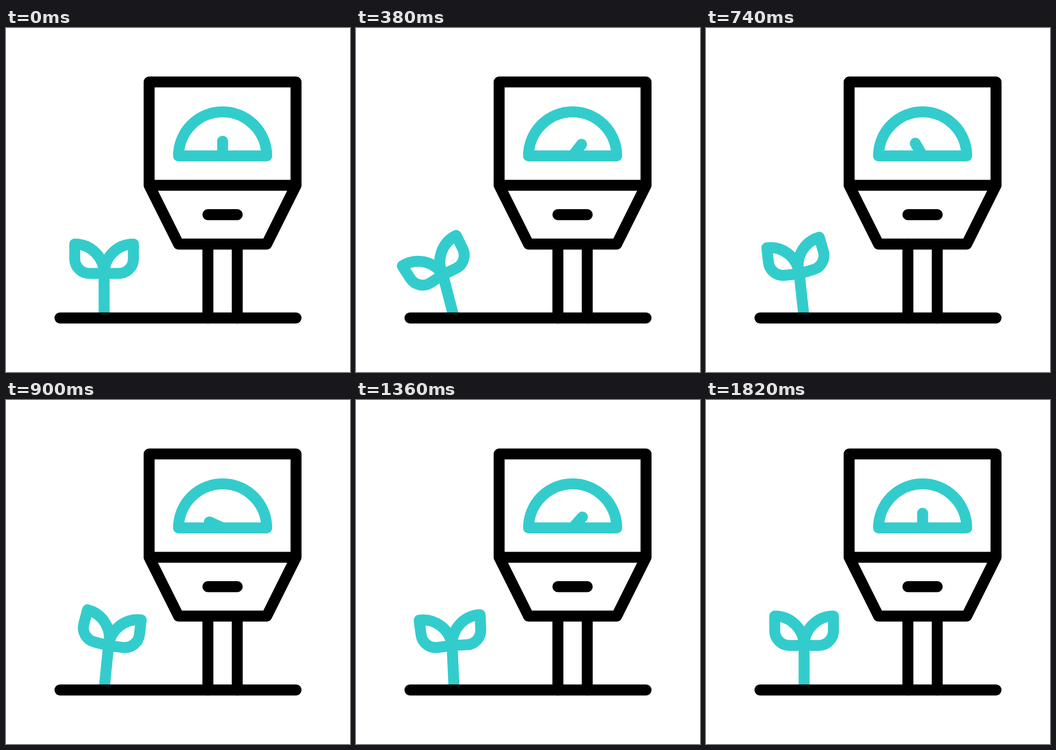
Recreate the animation shown at these times as an HTML page. Size 640 by 640 pixels, loop 2.4 s.

```html
<!DOCTYPE html>
<html>
<head>
<meta charset="utf-8">
<style>
html, body { margin: 0; height: 100%; overflow: hidden; background: #fff; }
svg { display: block; width: 100vw; height: 100vh; }
</style>
</head>
<body>
<svg viewBox="0 0 640 640" fill="none" stroke-width="20.4" stroke-linecap="round" stroke-linejoin="round">
  <g stroke="#33cccc">
    <path d="M321 238A82 82 0 0 1 485 238Z"/>
    <path id="needle" d="M403 238V210.8"/>
    <g id="stem">
      <path d="M182.5 456.6V539.6" stroke-linecap="butt"/>
      <path id="left" d="M182.5 456.6H155.2A27.3 27.3 0 0 1 127.9 429.3V401.9A54.6 54.7 0 0 1 182.5 456.6Z"/>
      <path id="right" d="M182.5 456.6H209.8A27.3 27.3 0 0 0 237.1 429.3V401.9A54.6 54.7 0 0 0 182.5 456.6Z"/>
    </g>
  </g>
  <g stroke="#000">
    <path d="M266.3 292.6V100.4H539.6V292.6ZL321 402H485L539.6 292.6"/>
    <path d="M375.6 402V539.5M430.2 402V539.5M375.6 347.3H430.2"/>
    <path d="M100.4 539.5H539.6"/>
  </g>
</svg>
<script>
const LOOP = 2400, STEP = 20;
const GAP = 22, END = 91; // steps between swing peaks, steps until rest

// Swings steadily from rest through evenly spaced peaks and back to rest
function swing(n, first, peaks) {
  const angles = [0, ...peaks, 0];
  const time = k => k == 0 ? 0 : k > peaks.length ? END : first + GAP * (k - 1);
  if (n >= END) return 0;
  let k = 0;
  while (time(k + 1) <= n) k++;
  const part = (n - time(k)) / (time(k + 1) - time(k));
  return angles[k] + (angles[k + 1] - angles[k]) * part;
}

function turn(id, angle, pivot) {
  document.getElementById(id).setAttribute("transform", `rotate(${angle} ${pivot})`);
}

const start = performance.now();

function draw() {
  const n = Math.floor((performance.now() - start) % LOOP / STEP);
  turn("needle", swing(n, 22.5, [44.5, -68.5, 44.5]), "403 238");
  turn("stem", swing(n, 27.2, [-20.8, 12, -5]), "182.5 539.6");
  turn("left", swing(n, 22, [-21, 9.5, -5.5]), "182.5 456.6");
  turn("right", swing(n, 30.5, [-19, 11.5, -5]), "182.5 456.6");
  requestAnimationFrame(draw);
}
draw();
</script>
</body>
</html>
```
